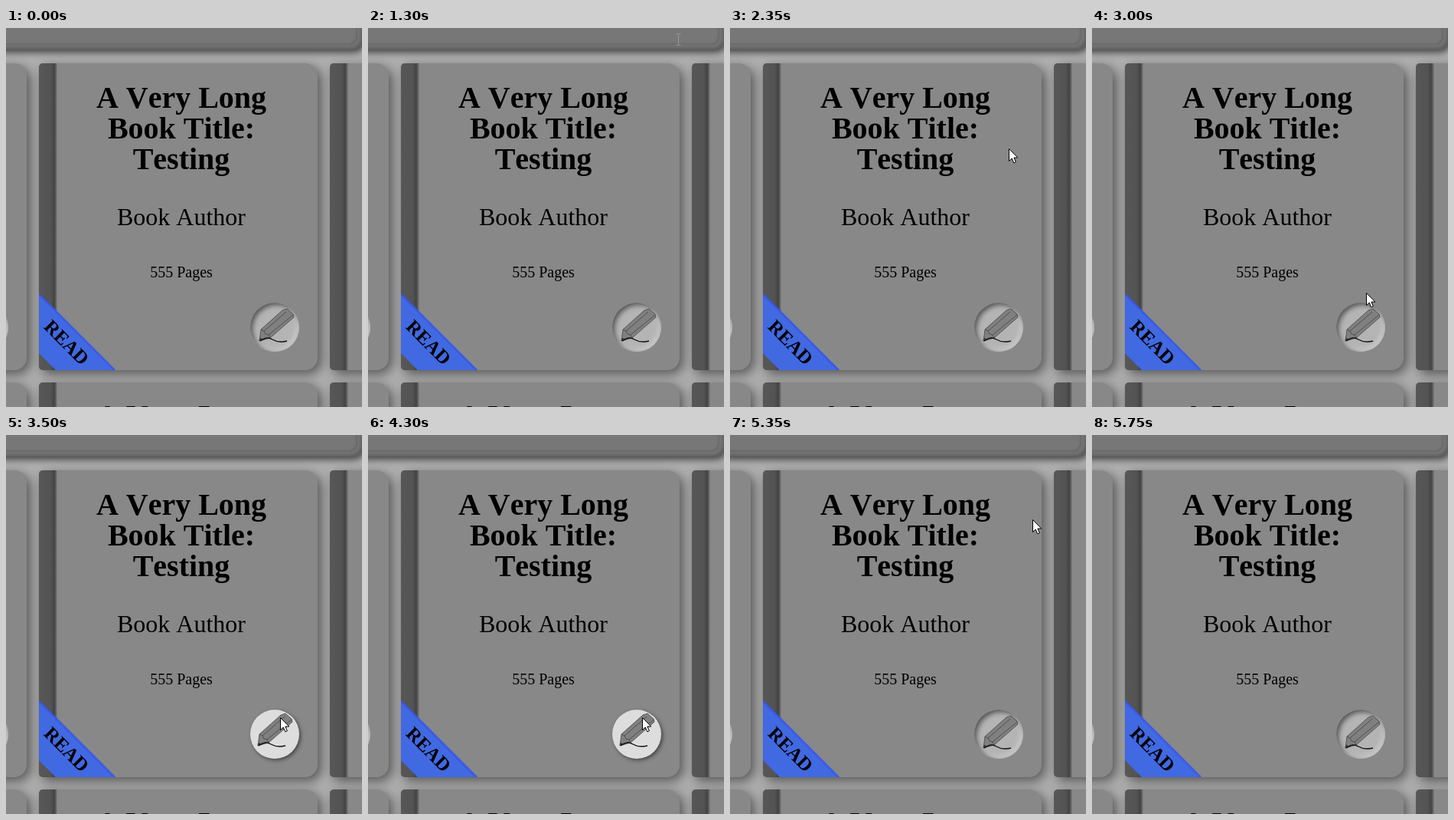
An HTML page that plays this animation: 465x494 px, repeating every 6.4 s.

```html
<!DOCTYPE html>
<html lang="en">
<head>
<meta charset="utf-8">
<title>Book cards</title>
<style>
  html, body { margin: 0; width: 100%; height: 100%; overflow: hidden; }
  body { position: relative; background: #b0b0b0; color: #000; font-family: "Liberation Serif", "Times New Roman", serif; font-kerning: none; }
  .bar, .field, .card, .card > *, .edit > *, #cursor { position: absolute; box-sizing: border-box; }
  .bar {
    left: -20px; top: -20px; width: 486px; height: 48px;
    background: #757575; border-radius: 0 0 14px 0;
    box-shadow: 3px 4px 10px #444, inset -2px -2px 4px #5c5c5c;
  }
  .field {
    left: 0; top: 0; width: 479px; height: 42px;
    background: #777; border-radius: 0 0 11px 0;
    box-shadow: inset -1px -1px 3px #626262;
  }
  .card {
    width: 364px; height: 400px;
    background: #888; border-radius: 5px 16px 16px 5px;
    box-shadow: 5px 5px 15px #555;
  }
  .spine {
    left: 0; top: 0; width: 24px; height: 400px; border-radius: 5px 0 0 5px;
    background: linear-gradient(90deg, #575757, #535353 65%, #434343 84%, #666 94%, #888);
  }
  .card p { left: 0; width: 372px; margin: 0; text-align: center; white-space: nowrap; }
  .card .title { top: 25px; font: bold 40px/40px "Liberation Serif", serif; font-kerning: none; }
  .low .title { top: 24px; }
  .card .author { top: 184px; font-size: 32px; line-height: 32px; }
  .card .pages { top: 262px; font-size: 20px; line-height: 20px; }
  .ribbon { display: none; left: 0; top: 300px; width: 100px; height: 100px; border-radius: 0 0 0 5px; overflow: hidden; }
  .active .ribbon { display: block; }
  .ribbon text { font: bold 25px "Liberation Serif", serif; font-kerning: none; text-anchor: middle; }
  .edit { left: 276px; top: 312px; width: 64px; height: 64px; }
  .edit > * { left: 0; top: 0; width: 64px; height: 64px; border-radius: 50%; }
  .rest { background: #b4b4b4; box-shadow: inset 3px 3px 6px #555, inset -3px -3px 6px #ccc; }
  .lift { background: #ddd; box-shadow: 2px 2px 5px #444; opacity: var(--h, 0); }
  .edit svg { overflow: visible; transform: translate(calc(var(--h, 0) * -2px), calc(var(--h, 0) * -3px)); }
  #cursor { left: 0; top: 0; width: 20px; height: 24px; overflow: visible; visibility: hidden; }
</style>
</head>
<body>
<div class="bar"><div class="field"></div></div>

<template id="book">
  <div class="card">
    <div class="spine"></div>
    <p class="title">A Very Long<br>Book Title:<br>Testing</p>
    <p class="author">Book Author</p>
    <p class="pages">555 Pages</p>
    <svg class="ribbon" viewBox="0 0 100 100">
      <path d="M0 0L100 100H22L0 78Z" fill="#4169e1"/>
      <path d="M0 1L99 100" stroke="#3450ee" stroke-width="3" opacity=".6"/>
      <text transform="translate(36 64) rotate(45)" y="8">READ</text>
    </svg>
    <div class="edit">
      <div class="rest"></div>
      <div class="lift"></div>
      <svg viewBox="0 0 64 64" stroke="#444" stroke-width=".8" stroke-linejoin="round" fill="none">
        <path d="M12 50L14 35L42 10L48 8L56 15L57 19L26 46Z" fill="#808080"/>
        <path d="M14 35L18 37L20 41L24 42L26 46M18 37L47 12M24 42L56 16"/>
        <path d="M12 50L13 46L16 48Z" fill="#333"/>
        <path d="M13 50C20 45 24 45 29 48S40 52 48 50" stroke="#111" stroke-width="1.4"/>
      </svg>
    </div>
  </div>
</template>

<svg id="cursor" viewBox="0 0 20 24">
  <path id="arrow" d="M.5 .5V16.5L4.2 13L6.8 18.8L9.4 17.7L6.9 12H11.8Z" fill="#fff" stroke="#000"/>
  <path id="beam" d="M-3 -7.5H-.5M.5 -7.5H3M0 -7V7M-3 7.5H-.5M.5 7.5H3" fill="none" stroke="#999"/>
</svg>

<script>
const LOOP = 6400, STEP = 50;
const $ = id => document.getElementById(id);

function addCard(col, row) {
  const card = $('book').content.firstElementChild.cloneNode(true);
  card.style.left = 43 + 380 * col + 'px';
  card.style.top = 46 + 416 * row + 'px';
  card.classList.toggle('low', row > 0);
  card.classList.toggle('active', !row && !col);
  document.body.insertBefore(card, $('cursor'));
}
for (const row of [0, 1]) {
  for (const col of [-1, 0, 1]) addCard(col, row);
}
const edit = document.querySelector('.active .edit');

// Pointer path: time, x, y; equal neighbours are rests.
const path = [
  [1300, 405, 15], [1500, 382, 72], [1800, 364, 128], [1950, 364, 128],
  [2350, 364, 157], [2600, 364, 227], [3000, 358, 345], [3250, 358, 368],
  [4250, 358, 368], [4300, 358, 368], [4550, 365, 300], [4900, 375, 214],
  [4950, 376, 208], [5300, 392, 125], [5550, 412, 47], [5700, 452, 15]
];

function slope(i, k) {
  const a = path[i - 1], b = path[i], c = path[i + 1];
  if (!a || !c || (b[k] - a[k]) * (c[k] - b[k]) <= 0) return 0;
  const p = (b[k] - a[k]) / (b[0] - a[0]), q = (c[k] - b[k]) / (c[0] - b[0]);
  return 2 * p * q / (p + q);
}

// Cubic Hermite interpolation of one coordinate.
function along(t, k) {
  let i = 0;
  while (i < path.length - 2 && t >= path[i + 1][0]) i++;
  const a = path[i], b = path[i + 1], d = b[0] - a[0], u = (t - a[0]) / d;
  const s = u * u * (3 - 2 * u);
  return a[k] + (b[k] - a[k]) * s
    + d * u * (1 - u) * ((1 - u) * slope(i, k) - u * slope(i + 1, k));
}

const ease = (t, start, len) => {
  const u = Math.min(1, Math.max(0, (t - start) / len));
  return u * u * (3 - 2 * u);
};

function draw(now) {
  const t = Math.floor(now % LOOP / STEP) * STEP;
  const shown = t >= 1300 && t < 5750;
  $('cursor').style.visibility = shown ? 'visible' : 'hidden';
  if (shown) {
    const x = Math.round(along(t, 1)), y = Math.round(along(t, 2));
    const typing = y < 22;
    const shift = typing ? .5 : 0;
    $('cursor').style.transform = `translate(${x + shift}px, ${y}px)`;
    $('arrow').style.display = typing ? 'none' : '';
    $('beam').style.display = typing ? '' : 'none';
  }
  edit.style.setProperty('--h', ease(t, 3050, 400) - ease(t, 4400, 400));
}

const start = performance.now();
(function tick() {
  draw(performance.now() - start);
  requestAnimationFrame(tick);
})();
</script>
</body>
</html>
```
